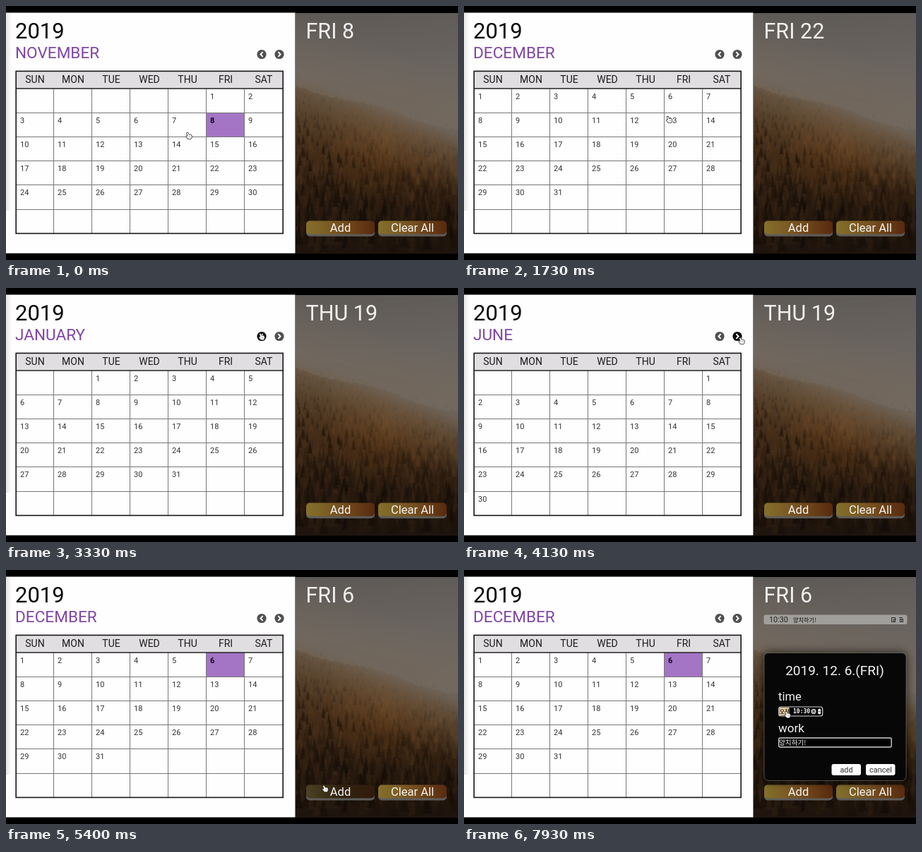
Write an HTML page with a canvas that moves like this. It is 640x360 px and loops after 8 s.

```html
<!DOCTYPE html>
<html lang="en">
<head>
<meta charset="utf-8">
<title>Calendar</title>
<style>
html, body { margin: 0; width: 100%; height: 100%; overflow: hidden; background: #000; }
canvas { display: block; width: 640px; height: 360px; }
</style>
</head>
<body>
<canvas id="stage" width="640" height="360"></canvas>
<script>
const LOOP = 8000;
const SANS = 'Roboto, sans-serif';
const KOREAN = '"Noto Sans CJK KR", "Noto Sans CJK", sans-serif';
const MONTHS = ['JANUARY', 'FEBRUARY', 'MARCH', 'APRIL', 'MAY', 'JUNE', 'JULY',
  'AUGUST', 'SEPTEMBER', 'OCTOBER', 'NOVEMBER', 'DECEMBER'];
const DAYS = ['SUN', 'MON', 'TUE', 'WED', 'THU', 'FRI', 'SAT'];
const PREV = { x: 362, y: 68.5 }, NEXT = { x: 387, y: 68.5 };
const ctx = document.getElementById('stage').getContext('2d');

// Pointer path: time, x, y
const path = [
  [0, 259, 184], [280, 298, 232], [380, 298, 232], [660, 388, 71],
  [1120, 388, 71], [1300, 362, 69], [1480, 362, 69], [1880, 258, 203],
  [2020, 258, 203], [2380, 362, 69], [3370, 362, 69], [3500, 388, 71],
  [4100, 393, 75], [4850, 393, 75], [5080, 312, 137], [5160, 312, 137],
  [5390, 452, 310], [5560, 452, 310], [5850, 457, 205], [8000, 458, 205]
];

function pointerAt(t) {
  let i = 0;
  while (i < path.length - 2 && t >= path[i + 1][0]) i++;
  const [t0, x0, y0] = path[i], [t1, x1, y1] = path[i + 1];
  const k = (t - t0) / (t1 - t0), e = k * k * (3 - 2 * k);
  return { x: x0 + (x1 - x0) * e, y: y0 + (y1 - y0) * e };
}

const clicks = (t, start, step, max) =>
  Math.max(0, Math.min(max, Math.floor((t - start) / step) + 1));

// Months away from November 2019
const monthOffset = t => clicks(t, 700, 130, 2)
  - clicks(t, 1400, 1, 1) - clicks(t, 2450, 1, 1)
  - clicks(t, 2605, 75, 11) + clicks(t, 3525, 120, 12);

function selectedDate(t) {
  if (t < 330) return new Date(2019, 10, 8);
  if (t < 1950) return new Date(2019, 10, 22);
  if (t < 5120) return new Date(2019, 11, 19);
  return new Date(2019, 11, 6);
}

function text(s, x, y, size, color, { align = 'left', font = SANS, weight = 400 } = {}) {
  ctx.font = `${weight} ${size}px ${font}`;
  ctx.textAlign = align;
  ctx.fillStyle = color;
  ctx.fillText(s, x, y);
}

function box(x, y, w, h, r, fill, stroke, width = 1) {
  ctx.beginPath();
  ctx.roundRect(x, y, w, h, r);
  if (fill) { ctx.fillStyle = fill; ctx.fill(); }
  if (stroke) { ctx.strokeStyle = stroke; ctx.lineWidth = width; ctx.stroke(); }
}

function line(c, width, ...pts) {
  ctx.beginPath();
  pts.forEach(([x, y]) => ctx.lineTo(x, y));
  ctx.strokeStyle = c;
  ctx.lineWidth = width;
  ctx.stroke();
}

function gradient(g, x0, y0, x1, y1, ...stops) {
  const lg = g.createLinearGradient(x0, y0, x1, y1);
  stops.forEach(([p, c]) => lg.addColorStop(p, c));
  return lg;
}

function tree(g, x, y, w, h) {
  g.beginPath();
  g.moveTo(x, y);
  for (const side of [1, -1]) {
    for (let i = 1; i <= 4; i++) {
      const j = side > 0 ? i : 5 - i;
      const wide = [x + side * w * j / 4, y + h * j / 4];
      const notch = [x + side * w * j / 8, y + h * j / 4 - 1];
      (side > 0 ? [wide, notch] : [notch, wide]).forEach(p => g.lineTo(...p));
    }
  }
  g.fill();
}

function paintForest() {
  const cv = document.createElement('canvas');
  cv.width = 231; cv.height = 341;
  const g = cv.getContext('2d');
  let seed = 11;
  const rnd = () => (seed = (seed * 16807) % 2147483647) / 2147483647;
  g.fillStyle = gradient(g, 0, 0, 20, 180, [0, '#5d5956'], [.5, '#69645f'], [1, '#746a60']);
  g.fillRect(0, 0, 231, 341);

  g.beginPath();
  g.moveTo(0, 112);
  g.quadraticCurveTo(35, 97, 60, 96);
  g.quadraticCurveTo(120, 116, 231, 140);
  g.lineTo(231, 200);
  g.lineTo(0, 200);
  g.fillStyle = gradient(g, 0, 92, 0, 140, [0, 'rgba(84,78,73,.5)'], [1, 'rgba(100,90,80,0)']);
  g.fill();

  const ridge = x => 104 + x * .28 + 3 * Math.sin(x / 24);
  g.beginPath();
  g.moveTo(0, 341);
  for (let x = 0; x <= 231; x += 3) g.lineTo(x, ridge(x) - rnd() * 3);
  g.lineTo(231, 341);
  g.fillStyle = gradient(g, 0, 110, 0, 341, [0, '#4d3c2a'], [.4, '#432c18'], [.7, '#2c1c11'], [1, '#1e140e']);
  g.fill();

  for (let row = 0; row < 18; row++) {
    const k = row / 17, h = 6 + 24 * k;
    for (let x = -5; x < 236; x += 3 + 5 * k) {
      const tx = x + rnd() * 6;
      const y = ridge(tx) * (1 - k) + k * 318 + (rnd() - .5) * 16 - h / 2;
      const l = .35 + 1.05 * rnd() * (1 - .3 * k);
      const fade = 1 - .5 * k;
      g.fillStyle = `rgba(${82 * l * fade},${54 * l * fade},${29 * l * fade},.7)`;
      tree(g, tx, y, h * .23, h);
    }
  }

  const glow = g.createRadialGradient(125, 185, 5, 125, 185, 95);
  glow.addColorStop(0, 'rgba(150,88,30,.26)');
  glow.addColorStop(1, 'rgba(150,88,30,0)');
  g.fillStyle = glow;
  g.fillRect(0, 60, 231, 240);
  // mist lies along the slope, thicker towards the right
  g.fillStyle = gradient(g, 151, 52, 88, 215, [0, 'rgba(114,104,94,0)'],
    [.48, 'rgba(114,104,94,.9)'], [.62, 'rgba(116,98,78,.6)'], [1, 'rgba(110,75,40,0)']);
  g.fillRect(0, 0, 231, 341);
  return cv;
}
const forest = paintForest();

function navButton({ x, y }, dir, hot) {
  ctx.beginPath();
  ctx.arc(x, y, 6.6, 0, 7);
  ctx.fillStyle = hot ? '#0c0c0c' : '#505050';
  ctx.fill();
  line('#fff', 1.9, [x - dir * 1.6, y - 3.3], [x + dir * 1.6, y], [x - dir * 1.6, y + 3.3]);
}

function calendar(t, tip) {
  ctx.fillStyle = '#fefefe';
  ctx.fillRect(0, 9.5, 409.5, 341);
  ctx.fillStyle = gradient(ctx, 0, 0, 8, 0, [0, 'rgba(0,0,0,.1)'], [1, 'rgba(0,0,0,0)']);
  ctx.fillRect(0, 10, 8, 280);

  const first = new Date(2019, 10 + monthOffset(t), 1);
  const year = first.getFullYear(), month = first.getMonth();
  const sel = selectedDate(t);
  text(year, 13, 46, 31, '#080808');
  text(MONTHS[month], 13, 73.5, 22.6, '#7f46a5');
  const near = b => Math.hypot(tip.x - b.x, tip.y - b.y) < 7;
  navButton(PREV, -1, near(PREV));
  navButton(NEXT, 1, near(NEXT));

  ctx.fillStyle = '#e0dee1';
  ctx.fillRect(14, 92, 378, 25);
  DAYS.forEach((d, i) => text(d, 41 + 54 * i, 109, 14, '#1c1c1c', { align: 'center' }));

  const lead = first.getDay(), count = new Date(year, month + 1, 0).getDate();
  const picked = sel.getFullYear() === year && sel.getMonth() === month ? sel.getDate() : 0;
  for (let d = 1; d <= count; d++) {
    const col = (lead + d - 1) % 7, row = Math.floor((lead + d - 1) / 7);
    if (d === picked) {
      ctx.fillStyle = '#a474c5';
      ctx.fillRect(13.5 + 54 * col, 117 + 34.2 * row, 54, 34.2);
    }
    text(d, (col ? 19 : 20) + 54 * col, 132 + 34.1 * row, 11,
      d === picked ? '#120a18' : '#333', { weight: d === picked ? 700 : 400 });
  }
  for (let i = 1; i < 7; i++) {
    line('#777', 1, [13.5 + 54 * i, 117], [13.5 + 54 * i, 322]);
    if (i < 6) {
      const y = Math.floor(117 + 34.2 * i) + .5;
      line('#777', 1, [14, y], [392, y]);
    }
  }
  line('#222', 1.5, [14, 117], [392, 117]);
  ctx.strokeStyle = '#161616';
  ctx.lineWidth = 1.6;
  ctx.strokeRect(14.2, 92.4, 378, 230);
}

function goldButton(label, x, tip) {
  const hot = tip.x > x && tip.x < x + 97 && tip.y > 304 && tip.y < 326;
  box(x, 307, 97, 19.5, 5, '#5e5d5b');
  box(x, 304.5, 97, 19, 5, hot
    ? gradient(ctx, x, 0, x + 97, 0, [0, '#4c4223'], [.5, '#30230f'], [1, '#321b0c'])
    : gradient(ctx, x, 0, x + 97, 0, [0, '#84702b'], [.5, '#765020'], [1, '#582a0e']));
  text(label, x + 48.5, 319.5, 16.5, '#f6f4f0', { align: 'center' });
}

function todoItem() {
  box(424.5, 63.5, 203, 13.5, 3, '#a19f9c');
  text('10:30', 432, 74, 10.8, '#222');
  text('양치하기!', 466, 73.5, 8.2, '#111', { font: KOREAN });
  ctx.lineWidth = 1;
  ctx.strokeStyle = '#333';
  ctx.strokeRect(605.5, 67.5, 5, 6);
  line('#333', 1, [607, 70], [612, 70]);
  line('#333', 1, [607, 72], [610, 72]);
  line('#333', 1, [616, 67.5], [621, 67.5]);
  ctx.strokeRect(617.5, 69.5, 4, 4);
  line('#333', 1, [619.5, 70], [619.5, 73]);
}

function dialog(t) {
  ctx.save();
  ctx.shadowColor = 'rgba(0,0,0,.75)';
  ctx.shadowBlur = 14;
  box(425, 117.5, 201, 181, 6, '#070707');
  ctx.restore();
  box(425, 117.5, 201, 181, 6, null, 'rgba(150,145,138,.5)');
  text('2019. 12. 6.(FRI)', 525, 148.5, 19, '#f4f4f4', { align: 'center' });
  text('time', 445, 185, 16.5, '#f4f4f4');
  text('work', 445, 230, 17, '#f4f4f4');

  box(445.7, 194, 62, 13, 3, '#000', '#d8d8d8', 1.2);
  const active = t >= 7470 || (t > 5920 && t < 6200);
  if (active) { ctx.fillStyle = '#e6cda4'; ctx.fillRect(446.5, 195, 14, 11); }
  text(t < 6130 ? '--' : '오전', 447, 203.5, 7.5, active ? '#3a2c18' : '#fff', { font: KOREAN, weight: 700 });
  text((t < 6270 ? '--' : '10') + ':' + (t < 6400 ? '--' : '30'), 466, 203.3, 8, '#fff',
    { font: '"DejaVu Sans Mono", monospace', weight: 700 });
  ctx.beginPath();
  ctx.arc(495, 200.4, 3.7, 0, 7);
  ctx.fillStyle = '#bdbdbd';
  ctx.fill();
  line('#111', 1, [493.5, 198.9], [496.5, 201.9]);
  line('#111', 1, [496.5, 198.9], [493.5, 201.9]);
  box(501.2, 196.5, 4, 8, 2, '#f2f2f2');
  line('#555', .8, [501.5, 200.5], [505, 200.5]);

  box(445.7, 238, 159.5, 13, 2, '#000', '#d0d0d0', 1.4);
  const work = '양치하기!'.slice(0, clicks(t, 6870, 110, 5));
  text(work, 446, 248.3, 9.6, '#fff', { font: KOREAN, weight: 500 });

  box(520.5, 275, 41.5, 16, 3, '#fcfcfc');
  box(569, 275, 41.5, 16, 3, '#fcfcfc');
  text('add', 541.5, 286.5, 10.8, '#333', { align: 'center' });
  text('cancel', 590, 286.5, 11, '#333', { align: 'center' });
}

function sidebar(t, tip) {
  ctx.drawImage(forest, 409.5, 9.5);
  const sel = selectedDate(t);
  text(`${DAYS[sel.getDay()]} ${sel.getDate()}`, 424.5, 46, 30.5, '#efefee');
  if (t >= 7470) todoItem();
  goldButton('Add', 425, tip);
  goldButton('Clear All', 527, tip);
  if (t >= 5530) dialog(t);
}

function hand({ x, y }) {
  ctx.save();
  ctx.translate(x, y);
  ctx.beginPath();
  [[-3, -4], [-1.6, -4.4], [-.2, -1.4], [2.6, -1.4], [4, .2], [3.6, 3.2],
    [2.2, 4.4], [-1, 4.2], [-3.8, 1.2], [-3.2, .2], [-1.6, .8]]
    .forEach(p => ctx.lineTo(...p));
  ctx.closePath();
  ctx.lineJoin = 'round';
  ctx.strokeStyle = '#222';
  ctx.lineWidth = 1.5;
  ctx.stroke();
  ctx.fillStyle = '#fff';
  ctx.fill();
  line('#777', .6, [.6, .4], [.9, 2.4]);
  line('#777', .6, [2.2, .4], [2.3, 2.4]);
  ctx.restore();
}

function draw(t) {
  ctx.fillStyle = '#000';
  ctx.fillRect(0, 0, 640, 360);
  const p = pointerAt(t), tip = { x: p.x - 2, y: p.y - 3 };
  calendar(t, tip);
  sidebar(t, tip);
  hand(p);
}

const start = performance.now();
function frame() {
  draw((performance.now() - start) % LOOP);
  requestAnimationFrame(frame);
}
frame();
</script>
</body>
</html>
```
